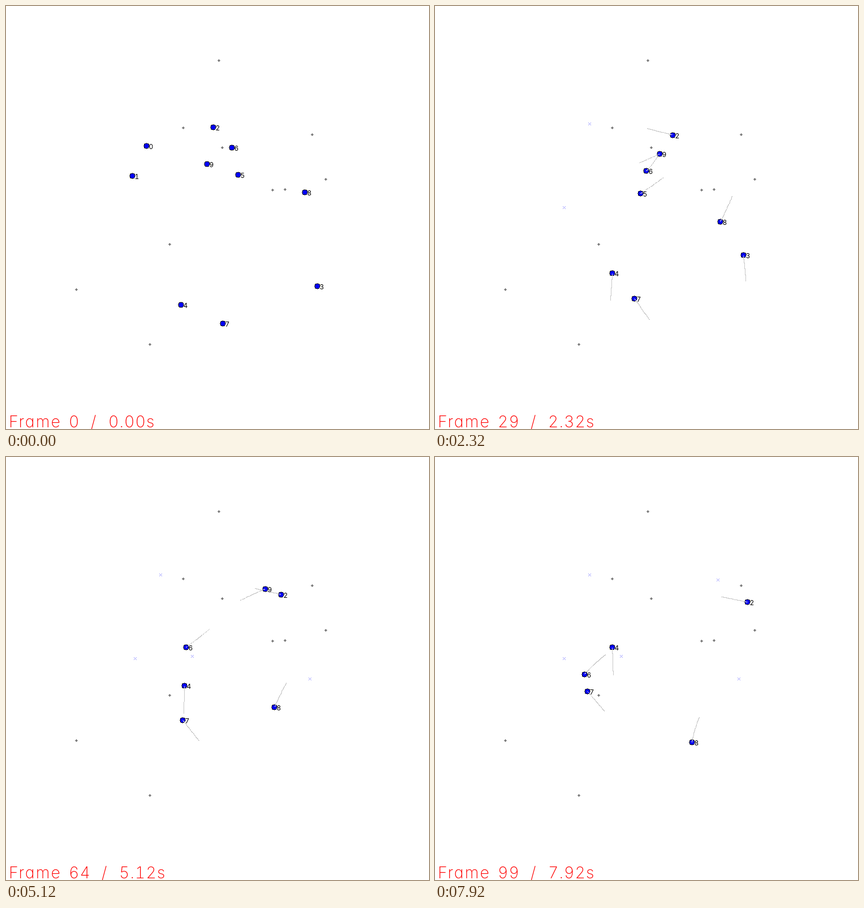
Recreate the animation shown at these times as an HTML page. Size 748 by 748 pixels, loop 8000 ms.

```html
<!DOCTYPE html>
<html lang="en">
<head>
<meta charset="utf-8">
<title>Moving agents</title>
<style>
  html, body { margin: 0; width: 100%; height: 100%; overflow: hidden; background: #fff; }
  svg { display: block; width: 748px; height: 748px; shape-rendering: crispEdges; }
  text { font-family: Inter, Roboto, sans-serif; font-variant-numeric: tabular-nums; }
  .label { font-size: 12px; }
  #caption { font-size: 28.5px; font-weight: 150; letter-spacing: 1px; fill: #f00;
             font-feature-settings: "tnum", "cv11"; }
  #word { letter-spacing: 2px; }
  .landmark { fill: #808080; }
  .goal { stroke: #a0a0ff; fill: none; }
  .dot { fill: #00f; stroke: #000; }
  .trail { stroke: #c8c8c8; fill: none; }
</style>
</head>
<body>
<svg viewBox="0 0 748 748">
  <g transform="translate(.5 .5)">
    <g id="landmarks"></g>
    <g id="scene"></g>
  </g>
  <g id="caption">
    <text id="word" x="5" y="744.5">Frame</text>
    <text id="count" x="111" y="744.5"></text>
    <text id="slash" y="744.5">/</text>
    <text id="clock" y="744.5"></text>
  </g>
</svg>
<script>
const STEP = 80, STEPS = 100, TRAIL = 25, LAST = STEPS - 1;
const $ = id => document.getElementById(id);

const landmarks = [[376, 96], [313, 215], [382, 250], [541, 227], [565, 306],
  [471, 325], [493, 324], [289, 421], [124, 501], [254, 598]];

// Each agent follows one Bezier curve, reaching its last point at step `arrival`.
const agent = (arrival, ...curve) => ({ arrival, curve });

const agents = [
  agent(25, [248, 247], [273, 208]),
  agent(30, [223, 300], [231, 329], [228, 356]),
  agent(LAST, [366, 214], [459, 238], [552, 256]),
  agent(54, [550, 495], [547, 444], [537, 392]),
  agent(LAST, [309, 528], [318, 433], [313, 336]),
  agent(49, [410, 298], [372, 327], [329, 352]),
  agent(LAST, [399, 250], [387, 301], [306, 334], [264, 384]),
  agent(LAST, [383, 561], [332, 485], [269, 414]),
  agent(LAST, [528, 329], [505, 388], [464, 446], [454, 504]),
  agent(91, [355, 279], [390, 267], [459, 228], [500, 217])
];

// Point on a Bezier curve of any degree.
function bezier(points, u) {
  if (points.length === 1) return points[0];
  return bezier(points.slice(1).map((p, i) =>
    p.map((v, c) => points[i][c] + (v - points[i][c]) * u)), u);
}

const position = ({ curve, arrival }, n) => bezier(curve, n / arrival).map(Math.round);

function drawAgent(a, id, n) {
  // An agent leaves just before touching its goal, which is then crossed.
  if (a.arrival < LAST && n >= a.arrival - 2) {
    const [x, y] = a.curve.at(-1);
    return `<path class="goal" d="M${x - 2.5} ${y - 2.5}l5 5m0-5l-5 5"/>`;
  }
  const [x, y] = position(a, n), trail = [];
  for (let k = Math.max(0, n - TRAIL); k <= n; k++) trail.push(position(a, k));
  return `<circle class="dot" cx="${x}" cy="${y}" r="4.6"/>
    <polyline class="trail" points="${trail.join(' ')}"/>
    <text class="label" x="${x + 4}" y="${y + 5}">${id}</text>`;
}

function draw(n) {
  $('scene').innerHTML = agents.map((a, id) => drawAgent(a, id, n)).join('');
  const shift = n > 9 ? 19 : 0;
  $('count').textContent = n;
  $('slash').setAttribute('x', 150 + shift);
  $('clock').setAttribute('x', 181 + shift);
  $('clock').textContent = (n * STEP / 1000).toFixed(2) + 's';
}

$('landmarks').innerHTML = landmarks.map(([x, y]) =>
  `<path class="landmark" d="M${x - 2.7} ${y}l2.7-2.7 2.7 2.7-2.7 2.7z"/>`).join('');

let shown = -1;
const start = performance.now();
function tick() {
  const n = Math.floor((performance.now() - start) / STEP) % STEPS;
  if (n !== shown) draw(shown = n);
  requestAnimationFrame(tick);
}
tick();
</script>
</body>
</html>
```
